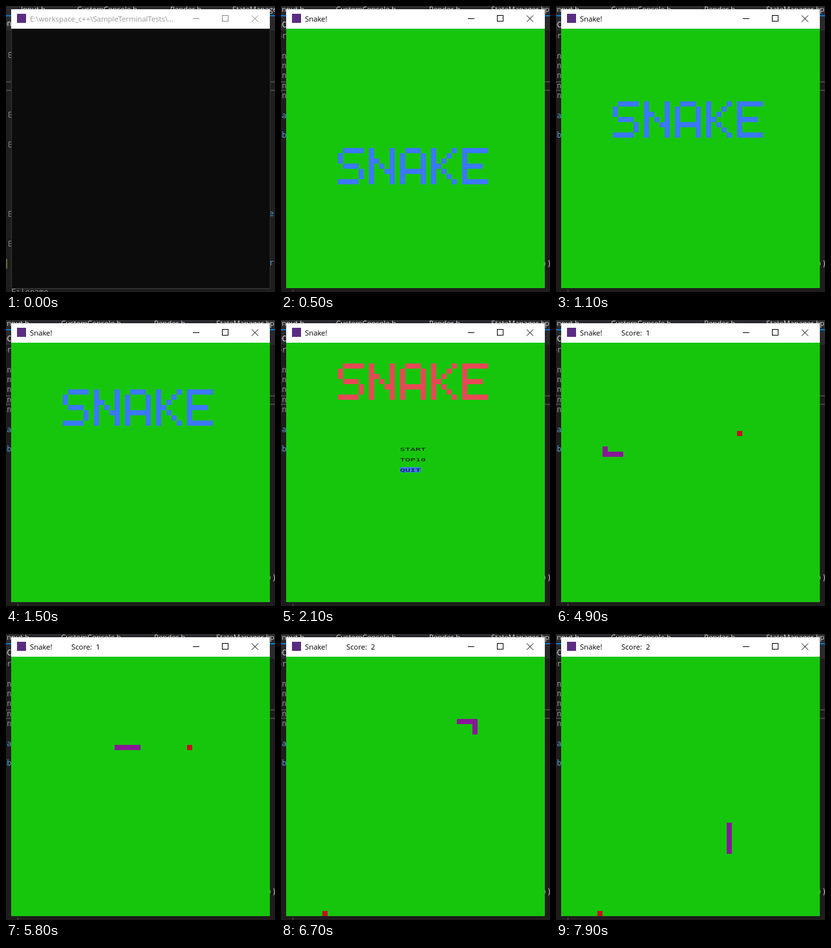
Write an HTML page that moves like this. It is 416 px wide and 441 px high and loops after 8 s.

```html
<!DOCTYPE html>
<html lang="en">
<head>
<meta charset="utf-8">
<title>Snake</title>
<style>
  html, body { margin: 0; width: 100%; height: 100%; overflow: hidden; background: #1e1e1e; }
  svg { display: block; width: 416px; height: 441px; }
  text { white-space: pre; }
  .ui { font-family: "Open Sans", "Noto Sans", sans-serif; font-size: 11.3px; }
  .code { font-family: "DejaVu Sans Mono", monospace; font-size: 12px; }
  .menu { font-family: "DejaVu Sans Mono", monospace; font-size: 7px; fill: #0c0c0c; }
  .crisp { shape-rendering: crispEdges; }
</style>
</head>
<body>
<svg viewBox="0 0 416 441" xmlns="http://www.w3.org/2000/svg">
  <g class="crisp">
    <rect id="desk" width="416" height="441"/>
    <rect width="416" height="38" fill="#2a2a2d"/>
    <rect y="14" width="416" height="2" fill="#007acc"/>
    <path d="M-2 116.5H420M-2 129.5H420" stroke="#464646" stroke-width="2"/>
  </g>
  <g id="tabs" class="ui" fill="#d8d8d8"></g>
  <g id="editorA" class="code"></g>
  <g id="editorB" class="code"></g>

  <rect class="crisp" x="8" y="5" width="400" height="30" fill="#fff"/>
  <rect x="17" y="12" width="14" height="14" fill="#5a2d82"/>
  <g class="ui">
    <text id="caption" x="37" y="24"></text>
    <text id="scoreLabel" x="101" y="24">Score:</text>
    <text id="score" x="139" y="24"></text>
  </g>
  <g id="buttons" fill="none">
    <path class="crisp" d="M289 19.5H299M334.5 14.5H343.5V23.5H334.5Z"/>
    <path d="M380 14.5L390 24.5M390 14.5L380 24.5"/>
  </g>
  <rect id="client" class="crisp" x="8" y="35" width="400" height="400"/>
  <path id="frame" class="crisp" d="M8.5 35V435.5H408.5V35" fill="none" stroke="#3a3a3a"/>
  <path id="logo" class="crisp"/>
  <g id="menu"></g>
  <path id="snake" class="crisp" fill="#881798"/>
  <path id="food" class="crisp" fill="#c50f1f"/>
</svg>
<script>
const LOOP = 8000, FRAME = 100, CELL = 8;
const BOOT = 300, MENU = 1800, PLAY = 2700;
const BLUE = '#3b78ff', RED = '#e74856', GREEN = '#16c60c', BLACK = '#0c0c0c';
const $ = id => document.getElementById(id);
const set = (el, attrs) => { for (const k in attrs) el.setAttribute(k, attrs[k]); };
const show = (id, on) => set($(id), { display: on ? 'inline' : 'none' });

function add(parent, tag, attrs, text = '') {
  const el = document.createElementNS('http://www.w3.org/2000/svg', tag);
  set(el, attrs);
  el.textContent = text;
  return parent.appendChild(el);
}

const cellsPath = cells => cells.map(([c, r]) =>
  `M${8 + c * CELL} ${35 + r * CELL}h${CELL}v${CELL}h-${CELL}z`).join('');

// Editor behind the window
[[23, 'Input.h'], [110, 'CustomConsole.h'], [254, 'Render.h'], [350, 'StateManager.h'], [433, 'pppp.h']]
  .forEach(([x, s]) => add($('tabs'), 'text', { x, y: 9 }, s));

const code = (id, x, y, fill, s) => add($(id), 'text', { x, y, fill }, s);
for (const y of [76, 168, 214, 321, 367])
  add($('editorA'), 'path', { d: `M4.5 ${y - 4.5}h8v8h-8zM6 ${y - .5}h4`, fill: 'none', stroke: '#8a8a8a' });
add($('editorA'), 'rect', { x: 0, y: 390, width: 2, height: 15, fill: '#577430' });
code('editorA', -6, 31, '#d8d8d8', 'on');
code('editorA', 407, 324, '#569cd6', 'e');
code('editorA', 407, 400, '#569cd6', 'r:');
code('editorA', 8, 445, '#8a8a8a', 'Filename');

code('editorB', -6, 33, '#d8d8d8', 'eC');
code('editorB', -6, 50, '#9b9b9b', 'pr');
for (let i = 0; i < 5; i++) code('editorB', -6, 81 + i * 15.2, '#9b9b9b', 'in');
code('editorB', -6, 173, '#569cd6', 'la');
code('editorB', -6, 203, '#569cd6', 'ub');
code('editorB', 404, 402, '#c8c8c8', '))');
add($('editorB'), 'path', { d: 'M18.5 437V441', stroke: '#555' });

// Block lettering, one string per row
const logoCells = [
  '.#### #...# .###. #...# #####',
  '#.... #...# #...# #..#. #....',
  '#.... ##..# #...# #.#.. #....',
  '.###. #.#.# #...# ##... ####.',
  '....# #..## ##### #.#.. #....',
  '....# #...# #...# #..#. #....',
  '####. #...# #...# #...# #####'
].flatMap((row, r) => [...row].flatMap((ch, c) => ch === '#' ? [[c + 10, r]] : []));
set($('logo'), { d: cellsPath(logoCells) });

const bars = ['START', 'TOP10', 'QUIT'].map((label, i) => {
  const y = 195 + i * 16;
  const bar = add($('menu'), 'rect',
    { class: 'crisp', x: 184, y, width: label.length * CELL, height: CELL, fill: BLUE });
  // Console glyphs are as wide as they are tall
  add($('menu'), 'text', { class: 'menu', transform: `translate(184 ${y + 6.5}) scale(1.9 1)` }, label);
  return bar;
});

// Snake route: direction and number of cells
const DIRS = { U: [0, -1], D: [0, 1], L: [-1, 0], R: [1, 0] };
const START_LENGTH = 4;
const route = [[25, 28]];
for (const [, dir, n] of 'U13L14D8R5U2L8U4R28U5L4D25'.matchAll(/([UDLR])(\d+)/g))
  for (let i = 0; i < +n; i++) {
    const [c, r] = route[route.length - 1];
    route.push([c + DIRS[dir][0], r + DIRS[dir][1]]);
  }
const foods = [[12, 21], [34, 17], [7, 49]];
const mealSteps = [43, 77];

function drawWindow(active) {
  set($('desk'), { fill: active ? '#1f1c1c' : '#1e1e1e' });
  set($('tabs'), { transform: `translate(${active ? -25 : 0} 0)` });
  show('editorA', !active);
  show('editorB', active);
  show('frame', !active);
  set($('client'), { fill: active ? GREEN : BLACK });
  set($('buttons'), { stroke: active ? '#000' : '#8a8a8a' });
  set($('caption'), { fill: active ? '#000' : '#999' });
  $('caption').textContent = active ? 'Snake!' : 'E:\\workspace_c++\\SampleTerminalTests\\...';
}

function drawIntro(t) {
  const row = Math.max(4, 25 - Math.floor((t - BOOT) / 71.4));
  set($('logo'), { transform: `translate(0 ${row * CELL})`, fill: t < 2100 ? BLUE : RED });
  const selected = t < 2100 ? 0 : t < 2200 ? 2 : t < 2400 ? 1 : 0;
  bars.forEach((bar, i) => set(bar, { visibility: i === selected ? 'visible' : 'hidden' }));
}

function drawGame(t) {
  const step = Math.floor((t - PLAY) * 0.0216 + 0.75);
  const score = mealSteps.filter(s => step >= s).length;
  const head = step + START_LENGTH - 1;
  const tail = Math.max(0, head - START_LENGTH - score + 1);
  set($('snake'), { d: cellsPath(route.slice(tail, head + 1)) });
  set($('food'), { d: cellsPath([foods[score]]) });
  $('score').textContent = score;
}

function render(time) {
  const t = Math.floor((time % LOOP) / FRAME) * FRAME;
  const playing = t >= PLAY;
  drawWindow(t >= BOOT);
  show('logo', t >= BOOT && !playing);
  show('menu', t >= MENU && !playing);
  for (const id of ['snake', 'food', 'scoreLabel', 'score']) show(id, playing);
  if (playing) drawGame(t);
  else if (t >= BOOT) drawIntro(t);
}

const start = performance.now();
function tick() {
  render(performance.now() - start);
  requestAnimationFrame(tick);
}
tick();
</script>
</body>
</html>
```
